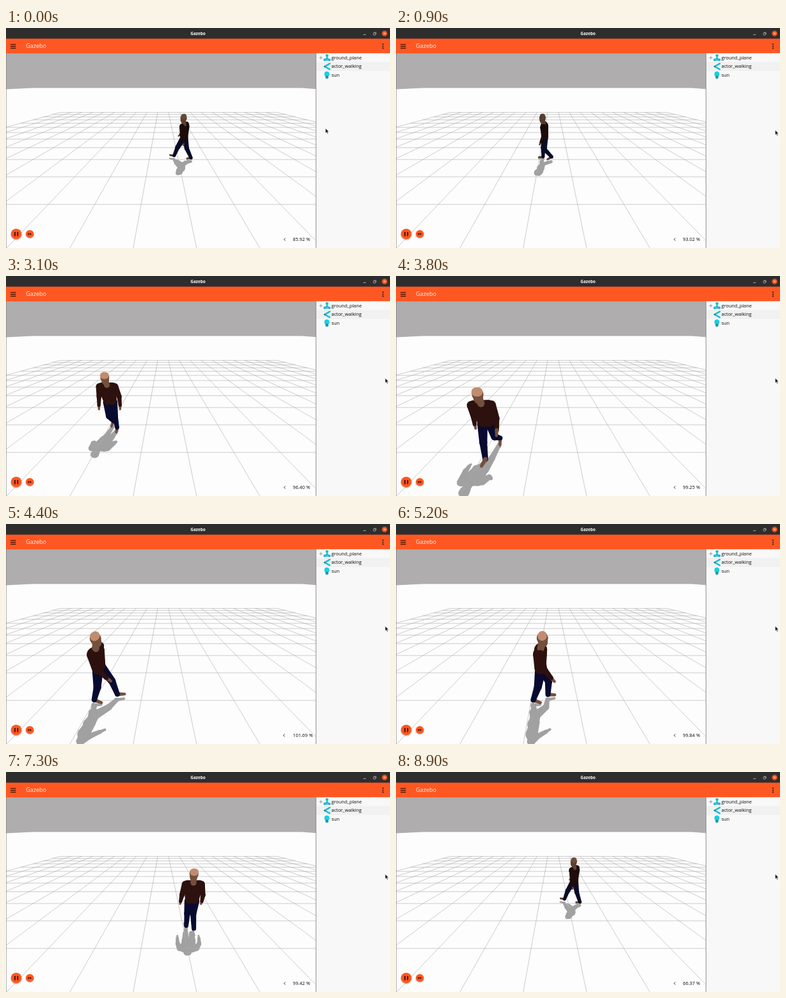
Write an HTML page with a canvas that moves like this. It is 600 px wide and 343 px high and loops after 9 s.

```html
<!DOCTYPE html>
<html lang="en">
<head>
<meta charset="utf-8">
<title>Gazebo</title>
<style>
  html, body { margin: 0; width: 100%; height: 100%; overflow: hidden; background: #fdfdfd; }
  canvas, svg { position: absolute; left: 0; top: 0; width: 600px; height: 343px; display: block; }
  text { font-family: "Open Sans", "Noto Sans", sans-serif; font-size: 7.4px; font-weight: 500; fill: #0c0c0c; }
</style>
</head>
<body>
<canvas id="scene"></canvas>
<svg viewBox="0 0 600 343">
  <!-- window bars -->
  <rect width="600" height="17" fill="#2e2d2d"/>
  <rect y="16.6" width="600" height="23" fill="#ff5722"/>
  <text x="300" y="10.9" text-anchor="middle" style="font-size:6.4px;font-weight:700;fill:#fff">Gazebo</text>
  <text x="31" y="31.1" style="font-size:9.1px;fill:#fff0ea">Gazebo</text>
  <path d="M7 25.5h8.5M7 28.4h8.5M7 31.3h8.5" stroke="#241008" stroke-width="1.2"/>
  <g fill="#241008"><circle cx="589" cy="25.2" r="1"/><circle cx="589" cy="28.4" r="1"/><circle cx="589" cy="31.6" r="1"/></g>
  <path d="M558.3 10.3h4" stroke="#ccc" stroke-width=".8"/>
  <path d="M574 7.8h3.2v3.2h-3.2zM575.2 7.6v-.8h3v3h-.8" fill="none" stroke="#ccc" stroke-width=".6"/>
  <circle cx="591.6" cy="8.5" r="4.3" fill="#e95420"/>
  <path d="M590 6.9l3.2 3.2m0-3.2l-3.2 3.2" stroke="#fff" stroke-width=".8"/>

  <!-- entity tree -->
  <rect x="484" y="39.6" width="116" height="304" fill="#f8f8f9"/>
  <rect x="484" y="53" width="116" height="14" fill="#f1f1f1"/>
  <path d="M484.4 39.6v304M.2 39.6v304" stroke="#777" stroke-width=".8"/>
  <path d="M489.3 46.3h5.4M492 43.6v5.4" stroke="#777" stroke-width=".7"/>
  <g stroke="#1296ae" stroke-width="1.2" fill="#16bcd6">
    <path d="M501.6 43.5v4l-4 2.6M501.6 47.5l4 2.6M497.6 50.1h8" fill="none"/>
    <g stroke="none"><circle cx="501.6" cy="43" r="2.2"/><circle cx="498" cy="49.6" r="2.1"/><circle cx="505.2" cy="49.6" r="2.1"/><circle cx="501.6" cy="47.4" r="1.8"/></g>
  </g>
  <path d="M506 55.4L497.8 60l8 4.4" fill="none" stroke="#16bcd6" stroke-width="2.4" stroke-linecap="round" stroke-linejoin="round"/>
  <circle cx="498" cy="60" r="1.2" fill="#0d7f96"/>
  <circle cx="501.4" cy="71.8" r="4" fill="#19cfe6"/>
  <path d="M499.2 74.5h4.4v3.8q-2.2 1.6-4.4 0z" fill="#1596ab"/>
  <text x="508.4" y="48.5">ground_plane</text>
  <text x="508.4" y="62.4">actor_walking</text>
  <text x="508.4" y="76.4">sun</text>

  <!-- playback -->
  <g fill="#000" opacity=".14"><circle cx="16" cy="322.2" r="9"/><circle cx="37.2" cy="322" r="6.8"/></g>
  <g fill="#ff5722"><circle cx="16" cy="321.2" r="8.3"/><circle cx="37.2" cy="321.2" r="6.2"/></g>
  <path d="M12.9 318h2v6.4h-2zM17.2 318h2v6.4h-2z" fill="#3a150a"/>
  <path d="M34.3 319.3l2.9 1.9-2.9 1.9zM37.3 319.3l2.9 1.9-2.9 1.9z" fill="#3a150a"/>
  <path id="chevron" d="M1.3-2L-.9 0 1.3 2" fill="none" stroke="#222" stroke-width=".9"/>
  <text id="rate" x="448.2" y="331.8"></text>

  <path id="cursor" d="M0 0v7.6l1.8-1.6 1.2 2.7 1.2-.5-1.2-2.7h2.4z" fill="#111" stroke="#fff" stroke-width=".5"/>
</svg>
<script>
const W = 600, H = 343, LOOP = 9000, STEP = 100;
const byId = id => document.getElementById(id);
const canvas = byId('scene'), ctx = canvas.getContext('2d');
const ratio = window.devicePixelRatio || 1;
canvas.width = W * ratio;
canvas.height = H * ratio;
ctx.scale(ratio, ratio);

// Piecewise linear lookup: each key is [time, ...values].
function at(keys, t) {
  let i = 1;
  while (i < keys.length - 1 && t > keys[i][0]) i++;
  const a = keys[i - 1], b = keys[i];
  const k = Math.min(1, Math.max(0, (t - a[0]) / (b[0] - a[0])));
  return a.slice(1).map((v, n) => v + (b[n + 1] - v) * k);
}

// seconds -> path clock, gait angle, real time factor
const CLOCK = [
  [0, 2.33, 1.57, 85.92], [1.7, 4, 10.1, 99.33], [3.1, 5.39, 15.71, 96.4],
  [4.4, 6.55, 20.02, 101.69], [6, 8.05, 32, 97.98], [7.3, 9.16, 34.56, 99.42],
  [8.9, 10.8, 39.1, 66.37], [9, 10.83, 39.27, 66.37]
];
// path clock -> across, away, quarter turns to the left
const E = 0.68, L = -1.28;
const PATH = [
  [0, E, 0, 0], [2, E, 2, 0], [2.5, E, 2, 1], [4, L, 2, 1], [4.5, L, 2, 2],
  [6, L, 0, 2], [6.5, L, 0, 3], [8, E, 0, 3], [8.5, E, 0, 4]
];

// Pitched camera: [across, away, height] -> screen
const FOCAL = 219.8, NEAR = 3.351, COS = 0.9045, SIN = 0.4263, DROP = 2.58;
function project([u, z, h]) {
  const d = COS * (z + NEAR) - SIN * h;
  const y = DROP - SIN * (z + NEAR) - COS * h;
  return { x: 245 + FOCAL * u / d, y: 191.5 + FOCAL * y / d, s: FOCAL / d, d };
}

function capsule(a, b, ra, rb, color) {
  const len = Math.hypot(b.x - a.x, b.y - a.y) || 1;
  const nx = (a.y - b.y) / len, ny = (b.x - a.x) / len;
  ctx.fillStyle = color;
  for (const [p, r] of [[a, ra], [b, rb]]) {
    ctx.beginPath();
    ctx.arc(p.x, p.y, r, 0, 7);
    ctx.fill();
  }
  ctx.beginPath();
  ctx.moveTo(a.x + nx * ra, a.y + ny * ra);
  ctx.lineTo(b.x + nx * rb, b.y + ny * rb);
  ctx.lineTo(b.x - nx * rb, b.y - ny * rb);
  ctx.lineTo(a.x - nx * ra, a.y - ny * ra);
  ctx.fill();
}

const mix = (a, b, k) => `rgb(${a.map((v, i) => Math.round(v + (b[i] - v) * k))})`;

// Bone parts in body space: [side, forward, height]
function skeleton(g, lit) {
  const shirt = mix([28, 11, 10], [45, 17, 14], lit);
  const pants = mix([10, 12, 38], [8, 10, 48], lit);
  const skin = mix([88, 60, 45], [116, 80, 61], lit);
  const crown = mix([88, 62, 48], [192, 140, 112], lit);
  const parts = [];
  const add = (a, b, ra, rb, color, bias = 0) => parts.push({ a, b, ra, rb, color, bias });
  const swing = (p, angle, len, side = 0) =>
    [p[0] + side, p[1] + Math.sin(angle) * len, p[2] - Math.cos(angle) * len];

  const legs = [-1, 1].map(side => {
    const w = side < 0 ? g : g + Math.PI;
    const thigh = 0.36 * Math.sin(w) + 0.12;
    const bend = 0.16 + 0.6 * Math.max(0, Math.cos(w + 0.2));
    const hip = [side * 0.075, 0, 0.83];
    const knee = swing(hip, thigh, 0.38);
    const ankle = swing(knee, thigh - bend, 0.36);
    const tilt = (thigh - bend) * 0.5;
    const toe = [ankle[0] + side * 0.02, ankle[1] + 0.15 * Math.cos(tilt), ankle[2] - 0.03 + 0.15 * Math.sin(tilt)];
    return { hip, knee, ankle, toe };
  });
  const drop = Math.min(...legs.map(l => Math.min(l.ankle[2], l.toe[2]))) - 0.035;
  for (const { hip, knee, ankle, toe } of legs) {
    add(ankle, toe, 0.043, 0.03, skin, 0.02);
    add(knee, ankle, 0.074, 0.055, pants);
    add(hip, knee, 0.1, 0.076, pants);
  }
  for (const side of [-1, 1]) {
    const w = side < 0 ? g + Math.PI : g;
    const arm = 0.38 * Math.sin(w);
    const shoulder = [side * 0.18, 0.02, 1.24];
    const elbow = swing(shoulder, arm - 0.05, 0.26, side * 0.06);
    const wrist = swing(elbow, arm + 0.32, 0.21, side * 0.015);
    const hand = swing(wrist, arm + 0.38, 0.1);
    add(wrist, hand, 0.034, 0.024, skin, -0.01);
    add(elbow, wrist, 0.056, 0.04, shirt);
    add(shoulder, elbow, 0.076, 0.058, shirt);
    add([side * 0.09, 0.01, 1.2], [side * 0.055, 0, 0.87], 0.12, 0.105, shirt);
  }
  add([-0.14, 0.02, 1.26], [0.14, 0.02, 1.26], 0.068, 0.068, shirt);
  add([0, 0.02, 1.27], [0, 0.05, 1.38], 0.065, 0.065, skin);
  add([0, 0.065, 1.38], [0, 0.055, 1.465], 0.082, 0.098, skin, -0.03);
  add([-0.02, 0.055, 1.505], [0.02, 0.055, 1.505], 0.076, 0.076, crown, -0.06);
  for (const p of parts) for (const end of ['a', 'b']) p[end] = [p[end][0], p[end][1], p[end][2] - drop];
  return parts;
}

function ground() {
  ctx.fillStyle = '#fdfdfe';
  ctx.fillRect(0, 39, 485, 304);
  ctx.fillStyle = '#afadae';
  ctx.beginPath();
  [[0, 39], [485, 39], [485, 95.2], [462, 93.6], [42, 93.6], [0, 95.4]].forEach(p => ctx.lineTo(...p));
  ctx.fill();
}

function grid() {
  const left = -9.467;
  ctx.strokeStyle = '#a9a9a9';
  ctx.lineWidth = 0.6;
  ctx.beginPath();
  const line = (a, b) => {
    const p = project(a), q = project(b);
    ctx.moveTo(p.x, p.y);
    ctx.lineTo(q.x, q.y);
  };
  for (let i = 0; i <= 20; i++) line([left + i, 11, 0], [left + i, -1.2, 0]);
  for (let z = 0; z <= 11; z++) line([left, z, 0], [left + 20, z, 0]);
  ctx.stroke();
}

function walker(clock, gait) {
  const [u, z, turn] = at(PATH, clock % 8.5);
  const a = turn * Math.PI / 2, c = Math.cos(a), s = Math.sin(a);
  const place = ([x, f, h]) => [u + x * c - f * s, z + x * s + f * c, h];
  const cast = ([x, y, h]) => project([x - 0.111 * h, y - 0.556 * h, 0]);
  const parts = skeleton(gait, 1 - Math.max(0, s)).map(p => {
    const from = place(p.a), to = place(p.b);
    const A = project(from), B = project(to);
    return { ...p, from, to, A, B, depth: (A.d + B.d) / 2 + p.bias };
  });
  for (const p of parts) {
    const A = cast(p.from), B = cast(p.to);
    capsule(A, B, p.ra * A.s * 0.85, p.rb * B.s * 0.85, '#a2a1a2');
  }
  grid();
  parts.sort((p, q) => q.depth - p.depth);
  for (const p of parts) capsule(p.A, p.B, p.ra * p.A.s, p.rb * p.B.s, p.color);
}

function draw(now) {
  const t = Math.floor((now % LOOP) / STEP) * STEP / 1000;
  const [clock, gait, rate] = at(CLOCK, t);
  ctx.save();
  ctx.beginPath();
  ctx.rect(0, 39, 485, 304);
  ctx.clip();
  ground();
  walker(clock, gait);
  ctx.restore();

  byId('rate').textContent = rate.toFixed(2) + ' %';
  byId('chevron').setAttribute('transform', `translate(${rate >= 100 ? 434.2 : 435.2} 329.6)`);
  const k = Math.min(1, t / 0.9), e = k * k * (3 - 2 * k);
  byId('cursor').setAttribute('transform', `translate(${499.2 + 93.3 * e} ${156.4 + 2.8 * e})`);
}

const start = performance.now();
function tick() {
  draw(performance.now() - start);
  requestAnimationFrame(tick);
}
tick();
</script>
</body>
</html>
```
